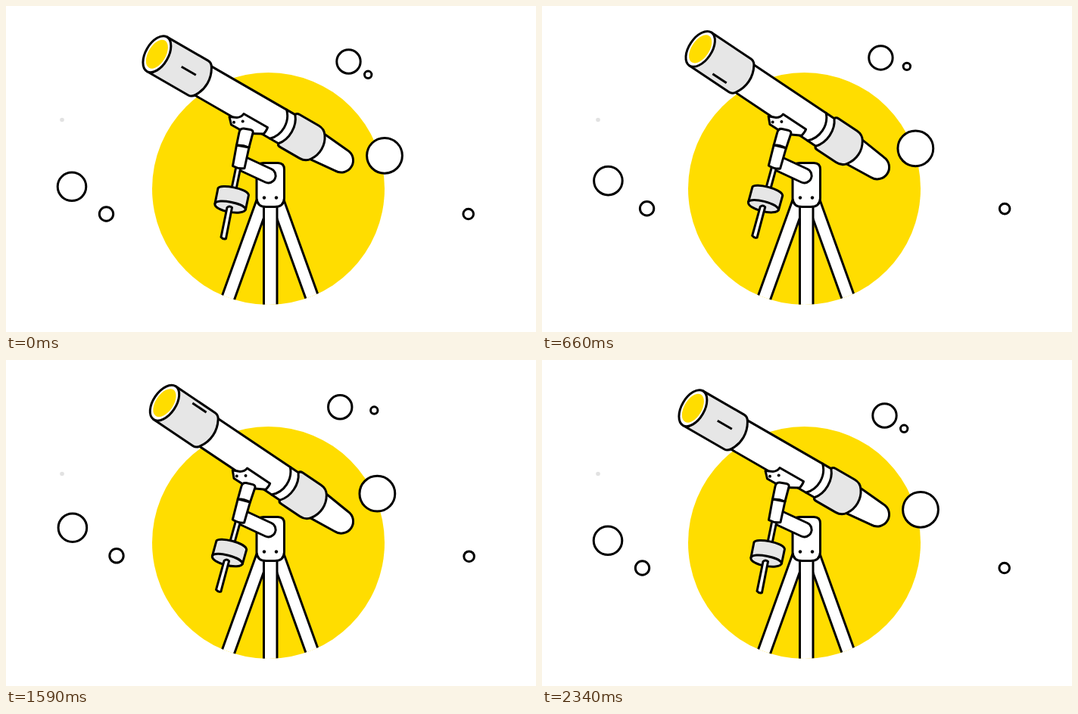
Write an HTML page that moves like this. It is 700 px wide and 431 px high and loops after 2850 ms.

```html
<!DOCTYPE html>
<html lang="en">
<head>
<meta charset="utf-8">
<title>Telescope</title>
<style>
  html, body { margin: 0; width: 100%; height: 100%; overflow: hidden; background: #fff; }
  svg { display: block; width: 100%; height: 100%; }
  .ink { fill: #fff; stroke: #000; stroke-width: 3; stroke-linejoin: round; stroke-linecap: round; }
  .grey { fill: #e6e6e6; }
  .line { fill: none; }
  .sun { fill: #fd0; }
</style>
</head>
<body>
<svg viewBox="0 0 700 431">
  <defs>
    <clipPath id="disc"><circle cx="346.5" cy="241.5" r="153.5"/></clipPath>
    <path id="barrel" d="M0 -26.3H63Q68 -26.3 71 -21C79 -8 79 8 71 21Q68 26.3 63 26.3H0Z"/>
    <clipPath id="shell"><use href="#barrel"/></clipPath>
  </defs>

  <circle class="sun" cx="346.5" cy="241.5" r="153.5"/>
  <circle cx="74" cy="150.5" r="2.8" fill="#e2e2e2"/>

  <!-- tripod -->
  <g class="ink" clip-path="url(#disc)">
    <path id="leg" d="M331.5 255L281.5 394H299.5L347 262Z"/>
    <use href="#leg" transform="matrix(-1 0 0 1 698 0)"/>
    <path d="M340.5 262V400H358V262Z"/>
  </g>
  <path class="ink" d="M340 207.5H359Q367.5 207.5 367.5 216V253Q367.5 265.5 355 265.5H343.5Q331 265.5 331 253V216Q331 207.5 340 207.5Z"/>
  <circle cx="341" cy="253.5" r="2.2"/>
  <circle cx="357" cy="253.5" r="2.2"/>
  <path class="ink" d="M314 198.5L350.5 215.5A9.5 9.5 0 0 1 342.5 233L306 216Z"/>

  <g id="scope">
    <!-- tube, drawn along its own axis -->
    <g class="ink" transform="translate(199.4 63.7) rotate(30)">
      <path d="M240 -19.5L281 -15.8A15.8 15.8 0 0 1 281 15.8L240 19.5Z"/>
      <path class="grey" d="M198 -22Q199 -25 203 -25H232Q241 -25 245.5 -18C253 -7 253 7 245.5 18Q241 25 232 25H202Q198 25 198 22Z"/>
      <path d="M185 -22H198C208 -10 208 10 198 22H185Z"/>
      <path d="M60 -22H185C197 -10 197 10 185 22H60Z"/>
      <use class="grey" href="#barrel"/>
      <g clip-path="url(#shell)"><path id="mark" d="M-11 .5L11 .5" stroke-linecap="butt"/></g>
      <ellipse rx="15" ry="26.3"/>
      <ellipse class="sun" rx="11.6" ry="20.9" stroke="none"/>
    </g>
    <!-- saddle -->
    <path class="ink" d="M295 146.5L305 147.5Q311 147 314 142.5L345.5 160.5Q344.5 164 340.5 169L318 168.5L297.5 157Z"/>
    <circle cx="301" cy="153.8" r="2"/>
    <circle cx="312.7" cy="152.5" r="2"/>
    <!-- counterweight -->
    <path class="ink" d="M304 212L297 246L303 247L310 213Z"/>
    <path class="ink" d="M304.500 184L321 187L315 214.500Q308 216 299.500 211.500Z"/>
    <path class="ink" d="M308 167Q309 161.500 314 162L323 163.500Q327 164.500 326 168L321 187Q313 183.500 304.500 184Z"/>
    <path class="ink grey" d="M280 241C283 235 319 241 320.500 250L316.500 269C313.500 278 273.500 271 276 261Z"/>
    <path class="ink line" d="M276 261C279 254 315 260.500 316.500 269"/>
    <path class="ink" d="M292 266.500L284 305.500Q287 309 290.500 307.500L298.500 266.500Q295 263.500 292 266.500Z"/>
  </g>

  <g id="bubbles" class="ink"></g>
</svg>

<script>
const LOOP = 2850, STEP = 30, END = 2340;
const scope = document.getElementById("scope");
const mark = document.getElementById("mark");
const layer = document.getElementById("bubbles");

// Adds a bubble that drifts by (dx, dy); mix blends the scope's timing into x
function bubble(x, y, r, dx, dy, mix = 0) {
  const el = document.createElementNS("http://www.w3.org/2000/svg", "circle");
  el.setAttribute("r", r);
  layer.append(el);
  return (p, q) => {
    el.setAttribute("cx", x + dx * (p + (q - p) * mix));
    el.setAttribute("cy", y + dy * p);
  };
}

const bubbles = [
  bubble(452.5, 73.5, 15.7, -12.5, -12.5),
  bubble(478.2, 90.8, 4.7, 9, -27),
  bubble(500, 197.8, 23.4, -11.5, -23.5, 0.5),
  bubble(87, 238.8, 18.8, 1, -19),
  bubble(132.5, 275, 9.2, 15, -18),
  bubble(610.7, 275, 6.8, 1, -17)
];

// Bezier easing whose end handles are flat
function ease(u, x1, x2) {
  u = Math.min(1, Math.max(0, u));
  let lo = 0, hi = 1;
  for (let i = 0; i < 24; i++) {
    const s = (lo + hi) / 2, r = 1 - s;
    if (3 * r * r * s * x1 + 3 * r * s * s * x2 + s * s * s < u) lo = s; else hi = s;
  }
  return lo * lo * (3 - 2 * lo);
}

const tilt = t => t < 1250
  ? ease(t / 1100, 0.24, 0.54)
  : 1 - ease((t - 1250) / (END - 1250), 0.42, 0.5);

const drift = t => t < 1350
  ? ease(t / 1350, 0.55, 0.55)
  : 1 - ease((t - 1350) / (END - 1350), 0.45, 0.68);

// The mark rolls off the lower edge and comes back over the upper one
const roll = t => -2.4 + (t < END / 2 ? 0.0305 * t : 0.0245 * (t - END));

function draw(now) {
  const t = Math.min(END, Math.floor((now % LOOP) / STEP) * STEP);
  const p = drift(t), q = tilt(t), n = roll(t);
  scope.setAttribute("transform", `rotate(${5 * q} 308 209)`);
  mark.setAttribute("transform", `translate(${48 - 0.3 * Math.abs(n)} ${n})`);
  bubbles.forEach(move => move(p, q));
}

const start = performance.now();
function tick() {
  draw(performance.now() - start);
  requestAnimationFrame(tick);
}
tick();
</script>
</body>
</html>
```
